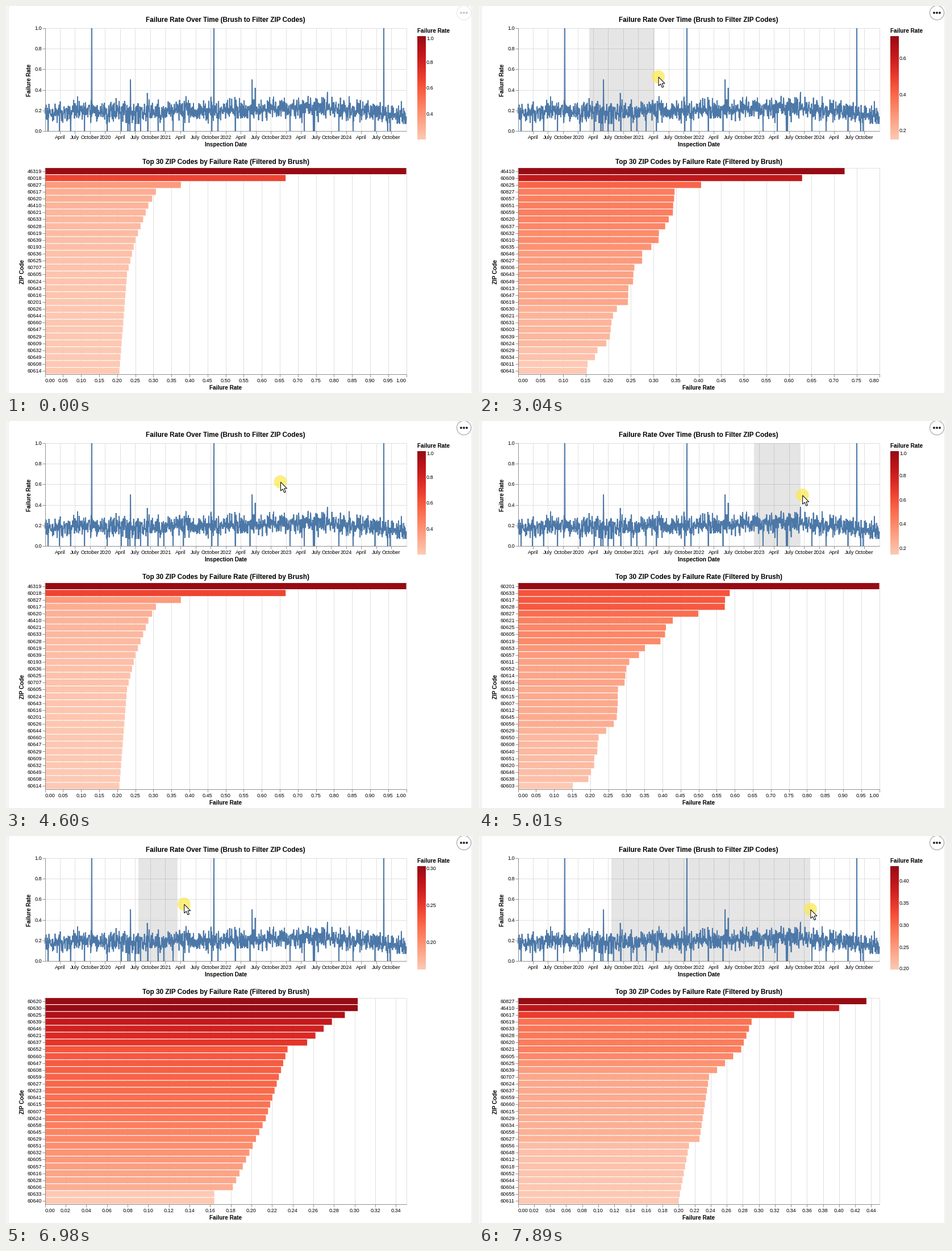
Recreate the animation shown at these times as a matplotlib script. Size 822x681 px, loop 8 s.

```python
import numpy as np
import matplotlib.pyplot as plt
from matplotlib.animation import FuncAnimation
from matplotlib.collections import LineCollection
from matplotlib.colors import LinearSegmentedColormap
from matplotlib.patches import Circle, FancyBboxPatch, Polygon, Rectangle

W, H, DPI = 822, 681, 64
LOOP, FRAMES = 8000, 125
STEP = LOOP // FRAMES
PT = 72 / DPI
LEFT, RIGHT = 68.7, 704.5
SPAN = RIGHT - LEFT
LINE_TOP, LINE_BOTTOM = 39, 220
BAR_TOP, BAR_BOTTOM = 284.5, 648.1
KEY_X, KEY_TOP, KEY_BOTTOM = 723.5, 53, 234.8
ROWS = 30
BAND = (BAR_BOTTOM - BAR_TOP) / ROWS
SMALL, MEDIUM, LARGE = 9.08, 9.99, 11.8
GRID, AXIS = "#dddddd", "#888888"
REDS = LinearSegmentedColormap.from_list("reds", [
    "#fdc9b4", "#fcb49a", "#fc9e80", "#fc8767", "#fa7051", "#f6573f",
    "#ec3f2f", "#dc2a25", "#c81b1d", "#b21218", "#970b13"])

plt.rcParams["font.family"] = "Liberation Sans"


def ranking(leaders, knots, seed=0):
    """ZIP codes, leaders first, with rates falling along rank: rate knots."""
    names = [c if len(c) == 5 else "606" + c for c in leaders.split()]
    others = [z for z in (f"606{n:02d}" for n in range(3, 61)) if z not in names]
    np.random.default_rng(seed).shuffle(others)
    rates = np.interp(range(ROWS), list(knots), list(knots.values()))
    return dict(zip(names + others, rates))


def scattered(rates, seed):
    """Rates as a very short date range would give them."""
    rng = np.random.default_rng(seed)
    loose = {z: min(1, r * rng.uniform(.3, 2)) for z, r in rates.items()}
    loose[list(rates)[seed]] = 1
    return loose


EVERYTHING = ranking(
    "46319 60018 60827 17 20 46410 21 33 28 19 39 60193 36 25 60707 "
    "05 24 43 16 60201 26 44 60 47 29 09 32 49 08 14",
    {0: 1, 1: .666, 2: .376, 3: .307, 5: .286, 10: .25, 15: .227, 29: .206})
FIRST = ranking("46410 20 25 24 09 49 59 39 60827 46 57 43",
                {0: .5, 1: .308, 2: .275, 8: .25, 13: .237, 18: .212, 29: .183}, 1)
SECOND = ranking("60201 60827 17 33 19 21 05 25 08 28 14 51",
                 {0: 1, 1: .545, 3: .47, 4: .327, 13: .261, 17: .231, 29: .194}, 2)
NARROW = ranking("30 20 25 39 46 21 37 52 60 47 08 59",
                 {1: .303, 3: .278, 6: .254, 7: .235, 17: .214, 27: .182, 28: .164}, 3)
WIDE = ranking("60827 46410 17 19 33 28 20 21 05 25 39 60707",
               {0: .434, 1: .4, 2: .344, 3: .291, 7: .278, 11: .238, 20: .226, 21: .213, 29: .2}, 4)

# start time, end time, left edge, final right edge, rates when short and long
DRAGS = [
    (2900, 4570, 194, 388, scattered(FIRST, 4), FIRST),
    (4800, 6720, 483.5, 608, scattered(SECOND, 9), SECOND),
    (6930, LOOP, 233, 583.5, NARROW, WIDE),
]
PRESSED = [(2700, 3780), (4570, 5740), (6720, LOOP)]
LAG = 13


def smooth(u):
    return u * u * (3 - 2 * u)


def ease_out(u):
    return 1 - (1 - u) ** 3


# start time, end time, destination, easing, optional control point
ENTRY = (530, 645)
MOVES = [
    (920, 1050, (508, 524), smooth, None),
    (1480, 2320, (193, 101.5), smooth, (354, 75)),
    (2860, 3500, (388, 138), ease_out, None),
    (4000, 4200, (483, 107), smooth, None),
    (4750, 5600, (608, 141), ease_out, None),
    (6050, 6440, (233, 117), smooth, None),
    (6920, 7980, (583.5, 129), ease_out, None),
]


def pointer_at(t):
    place = np.array(ENTRY, float)
    for start, end, goal, easing, control in MOVES:
        if t > start:
            goal = np.array(goal, float)
            bend = (place + goal) / 2 if control is None else np.array(control)
            u = easing(min(1, (t - start) / (end - start)))
            place = (1 - u) ** 2 * place + 2 * u * (1 - u) * bend + u * u * goal
    return place


def tick_step(span, count):
    raw = span / count
    power = 10.0 ** np.floor(np.log10(raw))
    factor = next((f for f in (10, 5, 2) if raw / power >= np.sqrt(f * {10: 5, 5: 2, 2: 1}[f])), 1)
    return factor * power


def nice_max(top):
    for _ in range(3):
        step = tick_step(top, 10)
        top = np.ceil(top / step - 1e-9) * step
    return top


def state_at(t):
    """Brush extent (or None) and the top rates as sorted pairs."""
    for start, end, left, right, short, long in DRAGS:
        if start <= t < end:
            edge = max(pointer_at(t - LAG)[0], left + 1)
            w = np.clip(((edge - left) / (right - left) - .22) / .74, 0, 1)
            low_short, low_long = min(short.values()) * .93, min(long.values()) * .93
            rates = {z: (1 - w) * short.get(z, low_short) + w * long.get(z, low_long)
                     for z in {**long, **short}}
            ranked = sorted(rates.items(), key=lambda pair: -pair[1])
            return (left, edge), ranked[:ROWS]
    return None, list(EVERYTHING.items())


fig = plt.figure(figsize=(W / DPI, H / DPI), dpi=DPI, facecolor="#f6f6f7")
ax = fig.add_axes([0, 0, 1, 1])


def label(x, y, text="", size=SMALL, ha="center", bold=False, upright=False):
    shift = .36 * size
    return ax.text(x + shift * upright, y + shift * (not upright), text,
                   size=size * PT, ha=ha, va="baseline", color="black",
                   weight="bold" if bold else "normal",
                   rotation=90 if upright else 0, rotation_mode="anchor")


def strokes(segments, color, z):
    return ax.add_collection(LineCollection(segments, colors=color, linewidths=.9 * PT, zorder=z))


def vertical(xs, y0, y1):
    return [[(x, y0), (x, y1)] for x in xs]


def horizontal(ys, x0, x1):
    return [[(x0, y), (x1, y)] for y in ys]


def frame_box(top, bottom):
    ax.add_patch(Rectangle((LEFT, top), SPAN, bottom - top, fill=False, ec=GRID, lw=.9 * PT, zorder=1))
    strokes(vertical([LEFT], top, bottom) + horizontal([bottom], LEFT, RIGHT), AXIS, 5)


def failure_series():
    """Noisy daily rates with days of no failures and a few tall spikes."""
    rng = np.random.default_rng(12)
    xs = np.linspace(LEFT, RIGHT, 1400)
    level = np.interp(xs, [69, 100, 137, 160, 200, 420, 560, 705],
                      [.175, .175, .22, .175, .185, .205, .225, .15])
    ys = np.clip(level + rng.normal(0, .05, xs.size), .07, .34)
    ys[rng.choice(xs.size, 28, replace=False)] = 0
    spikes = {151: 1, 219: .5, 248.5: .37, 366: 1, 433: .5, 438.5: .42, 566: .38, 665: 1}
    for x, y in spikes.items():
        ys[np.abs(xs - x).argmin()] = y
    return xs, LINE_BOTTOM - ys * (LINE_BOTTOM - LINE_TOP)


# page and key
ax.add_patch(FancyBboxPatch((14, 6), 796, 700, boxstyle="round,pad=10", fc="white", ec="#e9e9ea", lw=PT, zorder=0))
ax.imshow(np.linspace(1, 0, 256)[:, None], cmap=REDS, aspect="auto", zorder=2,
          extent=(KEY_X, KEY_X + 14.5, KEY_BOTTOM, KEY_TOP))
label(KEY_X + .3, 43.6, "Failure Rate", MEDIUM, "left", True)

# line chart
frame_box(LINE_TOP, LINE_BOTTOM)
quarters = np.arange(1, 24)
quarter_x = LEFT + (quarters * 1461 / 16 - 1) * SPAN / 2190
levels = np.linspace(0, 1, 6)
level_y = LINE_BOTTOM - levels * (LINE_BOTTOM - LINE_TOP)
strokes(vertical(quarter_x, LINE_TOP, LINE_BOTTOM) + horizontal(level_y, LEFT, RIGHT), GRID, 1)
strokes(vertical(quarter_x, LINE_BOTTOM, LINE_BOTTOM + 4.5) + horizontal(level_y, LEFT - 4.5, LEFT), AXIS, 5)
for q, x in zip(quarters, quarter_x):
    label(x, 230.7, ["%d" % (2019 + q // 4), "April", "July", "October"][q % 4])
for v, y in zip(levels, level_y):
    label(LEFT - 5.7, y - .3, f"{v:.1f}", ha="right")
ax.plot(*failure_series(), color="#4c78a8", lw=1.8 * PT, solid_joinstyle="miter", zorder=4)
label(386.7, 23.3, "Failure Rate Over Time (Brush to Filter ZIP Codes)", LARGE, bold=True)
label(387, 243.8, "Inspection Date", MEDIUM, bold=True)
label(40.8, 130, "Failure Rate", MEDIUM, bold=True, upright=True)
brush = ax.add_patch(Rectangle((0, LINE_TOP), 0, LINE_BOTTOM - LINE_TOP, fc="#333333", alpha=.125, lw=0, zorder=2))

# bar chart
frame_box(BAR_TOP, BAR_BOTTOM)
row_y = BAR_TOP + BAND * (np.arange(ROWS) + .5)
strokes(horizontal(row_y, LEFT - 4.5, LEFT), AXIS, 5)
bars = ax.barh(row_y, np.ones(ROWS), BAND * .9, left=LEFT, zorder=3, lw=0, snap=False)
row_labels = [label(LEFT - 5.7, y - .2, ha="right") for y in row_y]
rate_grid = strokes([], GRID, 1)
rate_ticks = strokes([], AXIS, 5)
rate_labels = [label(0, 658.6) for _ in range(32)]
key_labels = [label(KEY_X + 16.5, 0, ha="left") for _ in range(8)]
label(386.7, 273.4, "Top 30 ZIP Codes by Failure Rate (Filtered by Brush)", LARGE, bold=True)
label(387, 671.5, "Failure Rate", MEDIUM, bold=True)
label(28.2, 467.5, "ZIP Code", MEDIUM, bold=True, upright=True)

# menu button and pointer
button = [ax.add_patch(Circle((806, 12), 12.5, fc="white", ec="#999999", lw=PT, zorder=6))]
button += [ax.add_patch(Circle((x, 12), 1.9, fc="#1b1e23", lw=0, zorder=7)) for x in (801, 806, 811)]
halo = ax.add_patch(Circle((0, 0), 11.5, fc="#fde84f", alpha=.72, lw=0, zorder=8))
ARROW = np.array([(0, 0), (0, 15.5), (3.6, 12.2), (6.2, 18.4), (8.8, 17.3), (6.2, 11.3), (11, 11.3)]) + .5
arrow = ax.add_patch(Polygon(ARROW, fc="white", ec="black", lw=PT, zorder=9))

ax.set_xlim(0, W)
ax.set_ylim(H, 0)
ax.set_axis_off()


def draw_rate_axis(top):
    domain = nice_max(top)
    step = tick_step(domain, 18)
    ticks = np.arange(0, domain + step * .01, step)
    xs = LEFT + ticks / domain * SPAN
    rate_grid.set_segments(vertical(xs, BAR_TOP, BAR_BOTTOM))
    rate_ticks.set_segments(vertical(xs, BAR_BOTTOM, BAR_BOTTOM + 4.5))
    stride = 2 if xs[1] - xs[0] < 26.6 else 1  # drop labels that would touch
    shown = list(zip(ticks, xs))[::stride]
    for i, text in enumerate(rate_labels):
        text.set_visible(i < len(shown))
        if i < len(shown):
            value, x = shown[i]
            text.set_text(f"{value:.2f}")
            text.set_x(x)
            text.set_ha("left" if i == 0 else "right" if x > RIGHT - 1 else "center")
    return domain


def draw_key(low, high):
    step = tick_step(high - low, 4)
    ticks = np.arange(np.ceil(low / step - 1e-6), np.floor(high / step + 1e-6) + 1) * step
    for i, text in enumerate(key_labels):
        text.set_visible(i < len(ticks))
        if i < len(ticks):
            y = KEY_BOTTOM - (ticks[i] - low) / (high - low) * (KEY_BOTTOM - KEY_TOP)
            text.set_text(f"{ticks[i]:.{1 if step > .09 else 2}f}")
            text.set_y(np.clip(y - .5, 57, 233) + .36 * SMALL)


def update(i):
    t = (i + .5) * STEP
    extent, ranked = state_at(t)
    high, low = ranked[0][1], ranked[-1][1]
    domain = draw_rate_axis(high)
    draw_key(low, high)
    for bar, text, (code, rate) in zip(bars, row_labels, ranked):
        bar.set_width(rate / domain * SPAN)
        bar.set_facecolor(REDS((rate - low) / (high - low)))
        text.set_text(code)

    brush.set_visible(extent is not None)
    if extent:
        brush.set_x(extent[0])
        brush.set_width(extent[1] - extent[0])

    tip = pointer_at(t)
    arrow.set_xy(ARROW + tip)
    arrow.set_visible(t >= 920)
    halo.center = tip
    halo.set_visible(any(a <= t < b for a, b in PRESSED))
    for part in button:
        part.set_alpha(np.interp(t, [900, 1060], [.25, 1]))
    return []


anim = FuncAnimation(fig, update, frames=FRAMES, interval=STEP, init_func=lambda: [],
                     repeat=True, repeat_delay=0, blit=False)
plt.show()
```
